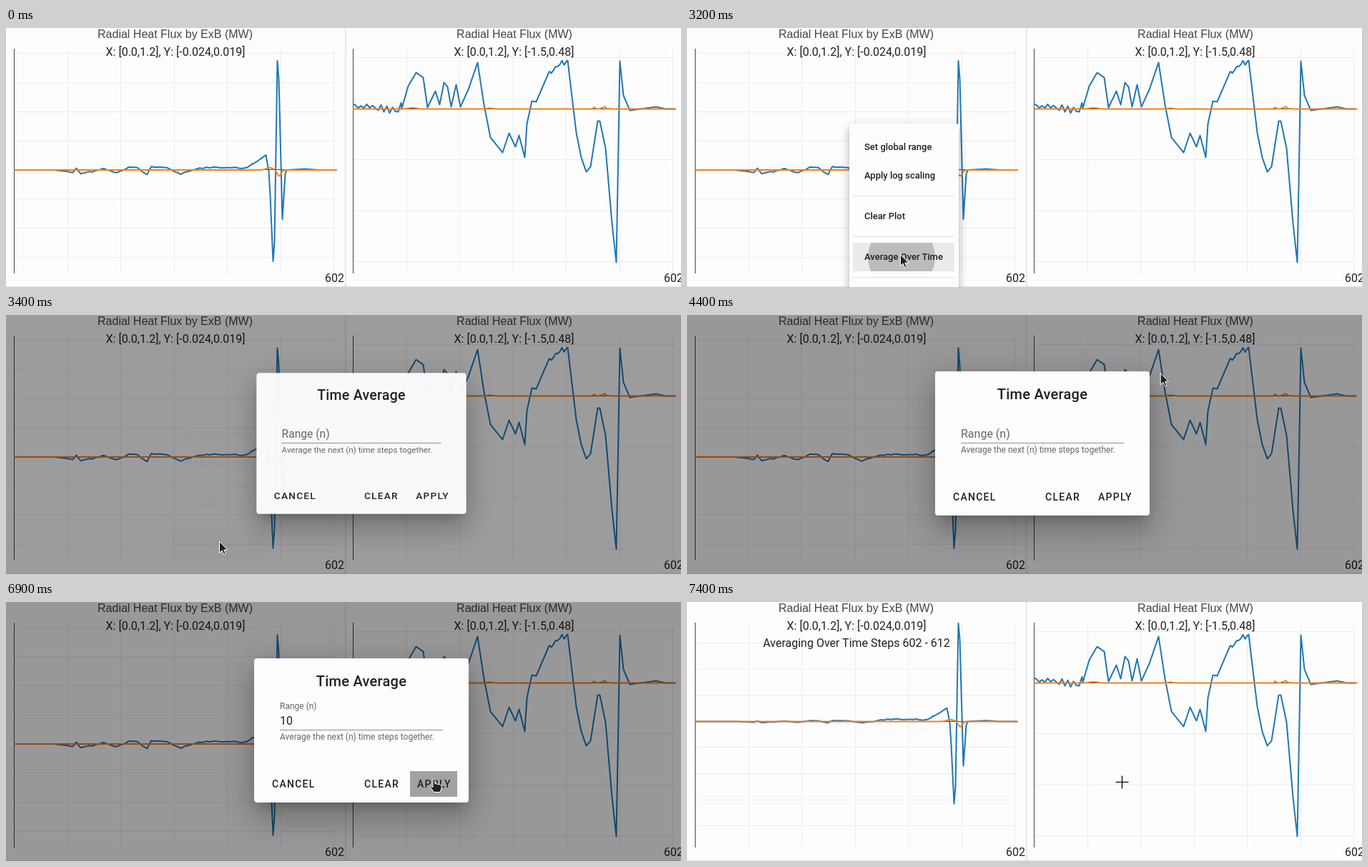
Write an HTML page that moves like this. It is 944x363 px and loops after 8000 ms.

```html
<!DOCTYPE html>
<html lang="en">
<head>
<meta charset="utf-8">
<title>Time average dialog</title>
<style>
  html, body { margin: 0; width: 100%; height: 100%; overflow: hidden; background: #e3e3e5; }
  #stage { position: relative; width: 944px; height: 363px; overflow: hidden; }
  #stage > * { position: absolute; }
  svg { display: block; }
  #stage > svg, #scrim { left: 0; top: 0; width: 944px; height: 363px; }
  text { font: 16px Roboto, sans-serif; fill: #212121; white-space: pre; }
  .title { font-family: "Liberation Sans", Arial, sans-serif; fill: #444; }
  .mid { text-anchor: middle; }
  .grid { stroke: #ebebf0; }
  .axis { stroke: #444; }
  .line { fill: none; stroke-width: 2; stroke-linejoin: round; }
  .blue { stroke: #1f77b4; }
  .orange { stroke: #f57f17; }
  #menu, #dialog { background: #fefdfe; border-radius: 4px; }
  #menu {
    left: 227px; top: 134px; width: 153px; height: 240px;
    box-shadow: 0 5px 5px -3px #0003, 0 8px 10px 1px #00000024, 0 3px 14px 2px #0000001f;
  }
  #menu text { font-size: 13px; font-weight: 500; }
  #scrim { background: #000; }
  #dialog {
    left: 347px; top: 79px; width: 300px; height: 202px;
    box-shadow: 0 11px 15px -7px #0003, 0 24px 38px 3px #00000024, 0 9px 46px 8px #0000001f;
  }
  #dialog .head { font-size: 20px; font-weight: 500; letter-spacing: .0125em; }
  #dialog .hint { font-size: 12px; fill: #666; }
  #dialog .btn { font-size: 14px; font-weight: 500; letter-spacing: .0893em; }
</style>
</head>
<body>
<div id="stage"></div>
<script>
const LOOP = 8000, STEP = 100;

// Key points "x,y" of the two blue curves; the first is relative to its zero line
const fluxKeys = keys(`11,0 66,0 93,3 98,-3 104,5.5 136,-1.5 155,4 171,-3.5 183,-2.5 197,6.5 203,-5
  224,-3.5 243,5.5 262,0 275,-3 288,-4 336,-3 352,-13 363,-21 367,2 369,36 373,128 375,101
  379,-153 381,-128 386,69 390,6 392,0 418,-1.5 436,0 462,0`);
const heatKeys = keys(`485,112 553,112 562,81 573,62 583,69 589,111 600,88 606,107 612,76 617,82 622,110
  629,79 635,110 646,86 659,48 668,107 677,153 694,174 703,147 712,166 717,150 725,181 728,134 735,102
  741,103 759,61 785,45 797,146 804,181 811,201 817,194 827,130 830,130 838,168 847,273 853,328 855,220
  858,46 863,94 872,115 909,110 922,113 936,113`);

function keys(s) { return s.trim().split(/\s+/).map(p => p.split(',').map(Number)); }
function along(rows, x) {
  const i = Math.max(1, rows.findIndex(r => r[0] >= x));
  const [x0, y0] = rows[i - 1], [x1, y1] = rows[i];
  return y0 + (y1 - y0) * (x - x0) / (x1 - x0);
}
const random = n => { const v = Math.sin(n * 127.1) * 43758.5453; return (v - Math.floor(v)) * 2 - 1; };
function noise(x, gap) {
  const i = Math.floor(x / gap), u = x / gap - i;
  return random(i) * (1 - u) + random(i + 1) * u;
}
const bump = (x, mid, width) => Math.exp(-(((x - mid) / width) ** 2));
const inside = (v, from, to) => v >= from && v < to;

// Averaging damps the noisy part far more than the pulse
const flux = x => along(fluxKeys, x) + (inside(x, 80, 345) ? noise(x, 5) : 0);
const meanFlux = x => flux(x) * (x < 260 ? .3 : .9);
const fluxRef = x => 8.5 * bump(x, 381.5, 4) - 3 * bump(x, 368, 7);
const meanRef = x => .85 * fluxRef(x);
const heat = x => along(heatKeys, x) - 113
  + (x < 553 ? 8 * noise(x, 4) : inside(x, 760, 784) ? 5 * noise(x, 3) : 0);
const heatRef = x => -1.5 * bump(x, 568, 8) - bump(x, 676, 6)
  + (inside(x, 821, 847) ? 2 * noise(x, 3) - 1.5 : 0);

const text = (x, y, s, cls = '') => `<text x="${x}" y="${y}" class="${cls}">${s}</text>`;
const seg = (x1, y1, x2, y2, cls) => `<path d="M${x1} ${y1}L${x2} ${y2}" class="${cls}"/>`;
function curve(x, zero, f, cls) {
  let pts = '';
  for (let i = x; i <= x + 451; i++) pts += `${i + .5},${(zero + f(i)).toFixed(1)} `;
  return `<polyline points="${pts}" class="line ${cls}"/>`;
}

// x: left edge, top/gap/rows: grid rows, base: index of the zero row
function plot({ x, top, gap, rows, base, zero, blue, orange }) {
  let out = '';
  for (let i = 1; i <= 6; i++) {
    const gx = Math.round(x + i * 74.5) + .5;
    out += seg(gx, 29, gx, 344, 'grid');
  }
  for (let i = 0; i < rows; i++) {
    const gy = Math.round(top + i * gap) + .5;
    out += seg(x, gy, x + 451, gy, i === base ? 'axis' : 'grid');
  }
  return out + seg(x + .5, 29, x + .5, 344, 'axis')
    + curve(x, zero, blue, 'blue') + curve(x, zero, orange, 'orange');
}
const raw = plot({ x: 11, top: 35, gap: 40.86, rows: 8, base: 4, zero: 199, blue: flux, orange: fluxRef });
const avg = plot({ x: 11, top: 57, gap: 36.6, rows: 8, base: 3, zero: 167.5, blue: meanFlux, orange: meanRef });
const right = plot({ x: 485, top: 41, gap: 71.5, rows: 5, base: 1, zero: 113.5, blue: heat, orange: heatRef });

const charts = `<svg>
  <rect x="-9" y="-9" width="483" height="371" rx="4" fill="#fefdfe"/>
  <rect x="475.5" y="-9" width="483" height="371" rx="4" fill="#fefdfe"/>
  <g id="left">
    ${text(236.5, 14, 'Radial Heat Flux by ExB (MW)', 'title mid')}
    <g id="raw">${raw}</g><g id="avg">${avg}</g>
  </g>
  ${right}
  ${text(711, 14, 'Radial Heat Flux (MW)', 'title mid')}
  ${text(237, 39, 'X: [0.0,1.2], Y: [-0.024,0.019]', 'mid')}
  ${text(710.5, 39, 'X: [0.0,1.2], Y: [-1.5,0.48]', 'mid')}
  ${text(459.5, 356, '602', 'mid')}${text(933.5, 356, '602', 'mid')}
  <g id="note">${text(237, 63, 'Averaging Over Time Steps 602 - 612', 'mid')}</g>
</svg>`;

const menu = `<div id="menu"><svg width="153" height="240" viewBox="227 134 153 240">
  <g id="press">
    <rect x="232" y="301" width="142" height="40" fill="#000" opacity=".07"/>
    <svg x="232" y="301" width="142" height="40"><circle id="wave" cx="68" cy="20" opacity=".2"/></svg>
  </g>
  ${[235.5, 292.5, 349.5].map(y => `<path d="M232 ${y}H374" stroke="#dddce0"/>`).join('')}
  ${text(248, 171, 'Set global range')}${text(248, 211, 'Apply log scaling')}
  ${text(248, 268, 'Clear Plot')}${text(248, 325, 'Average Over Time')}
</svg></div>`;

const dialog = `<div id="dialog"><svg width="300" height="202" viewBox="347 79 300 202">
  ${text(497, 118, 'Time Average', 'head mid')}
  <text id="label">Range (n)</text>
  <g id="value">${text(383, 172, '10')}</g>
  <path d="M383 179.5H611" stroke="#8f8f8f"/>
  <path id="focus" d="M-114 180H114" stroke="#1a84c7" stroke-width="2"/>
  <path id="caret" d="M0 158V176" stroke="#1a84c7"/>
  <path id="dash" d="M495 179.5H499" stroke="#333" stroke-width="2"/>
  <g id="spin"><rect x="597" y="157" width="13" height="20" fill="#efeff1"/>
    <path d="M599.5 164.5L603.5 160L607.5 164.5ZM599.5 170L603.5 174.5L607.5 170Z" fill="#444"/></g>
  ${text(383, 193, 'Average the next (n) time steps together.', 'hint')}
  <svg x="565" y="237" width="66" height="36"><circle id="tap" cx="33" cy="14" opacity=".36"/></svg>
  ${text(372, 260, 'CANCEL', 'btn')}${text(501, 260, 'CLEAR', 'btn')}${text(575, 260, 'APPLY', 'btn')}
</svg></div>`;

const stroked = d => `<path d="${d}" fill="none" stroke="#fff" stroke-width="3.4"/>
  <path d="${d}" fill="none" stroke="#222" stroke-width="1.6"/>`;
const solid = d => `<path d="${d}" fill="#222" stroke="#fff" stroke-linejoin="round"/>`;
const shapes = {
  cross: stroked('M-9 0H9M0 -9V9'),
  beam: stroked('M-3 -8H-1L0 -7L1 -8H3M0 -7V7M-3 8H-1L0 7L1 8H3'),
  arrow: solid('M0 0V16L3.7 12.6L6.2 18.3L8.8 17.2L6.3 11.6H11.3Z'),
  hand: solid('M-1.5 0Q0 -1.5 1.5 0V6L9 7.5Q10.5 8 10.5 10V13L8.5 18H0L-5 11Q-4.5 9 -1.5 11Z')
};
const pointer = `<svg><circle id="dot" cx="251" cy="166.5" r="2.3" fill="#1f77b4"/><g id="cursor">${
  Object.entries(shapes).map(([k, s]) => `<g id="${k}">${s}</g>`).join('')}</g></svg>`;

document.getElementById('stage').innerHTML = charts + menu + '<div id="scrim"></div>' + dialog + pointer;

const $ = id => document.getElementById(id);
const show = (id, on) => { $(id).style.display = on ? '' : 'none'; };
const ramp = (t, from, to) => Math.min(1, Math.max(0, (t - from) / (to - from)));
const out = (u, power) => 1 - (1 - u) ** power;
const smooth = u => u * u * (3 - 2 * u);

// Cursor moves: start, end, x, y
const moves = [
  [700, 800, 227, 134], [2300, 2900, 298, 317], [3800, 4300, 697, 67],
  [4300, 4700, 471, 157], [6200, 6500, 598, 248], [6900, 7100, 608, 252]
];
const looks = [[0, ''], [700, 'cross'], [2200, 'arrow'], [4600, 'beam'], [6300, 'arrow'], [6500, 'hand'], [7000, 'cross']];

function cursorAt(t) {
  let x = 349, y = 51;
  for (const [from, to, nx, ny] of moves) {
    const u = smooth(ramp(t, from, to));
    x += (nx - x) * u;
    y += (ny - y) * u;
  }
  return `${x + .5} ${y + .5}`;
}

function draw(t) {
  const averaged = t >= 7400, redraw = inside(t, 7100, 7300);
  show('raw', !averaged);
  show('avg', averaged);
  show('note', averaged);
  show('dot', redraw);
  $('left').setAttribute('transform', `translate(${redraw ? -2 : 0} 0)`);

  const open = ramp(t, 3200, 3500), close = ramp(t, 6900, 7200);
  $('menu').style.opacity = out(ramp(t, 1500, 1800), 3) - out(open, 3);
  show('press', t >= 3200);
  $('wave').setAttribute('r', 47 + 33 * open);

  $('scrim').style.opacity = .4 * (out(open, 3) - ramp(t, 6900, 7300));
  $('dialog').style.opacity = out(open, 3) - close ** 2.5;
  $('dialog').style.transform = `scale(${.8 + .2 * out(open, 2) - .27 * close})`;

  const lift = out(ramp(t, 4700, 5100), 4), active = inside(t, 4800, 6700);
  $('label').setAttribute('transform', `translate(383 ${172 - 22 * lift}) scale(${1 - .25 * lift})`);
  $('label').style.fill = active ? '#1a84c7' : '#666';
  $('focus').setAttribute('transform', `translate(497 0) scale(${lift} 1)`);
  show('focus', active);
  show('spin', active);
  show('value', t >= 5600);
  show('caret', inside(t, 5000, 6300));
  $('caret').setAttribute('transform', `translate(${t < 5600 ? 383.5 : 401} 0)`);
  show('dash', t >= 7000);
  $('tap').setAttribute('r', 60 * ramp(t, 6600, 6900));

  const look = looks.filter(r => r[0] <= t).pop()[1];
  for (const k in shapes) show(k, k === look);
  $('cursor').setAttribute('transform', `translate(${cursorAt(t)})`);
}

const start = performance.now();
function tick() {
  const t = (performance.now() - start) % LOOP;
  draw(Math.floor(t / STEP) * STEP);
  requestAnimationFrame(tick);
}
tick();
</script>
</body>
</html>
```
